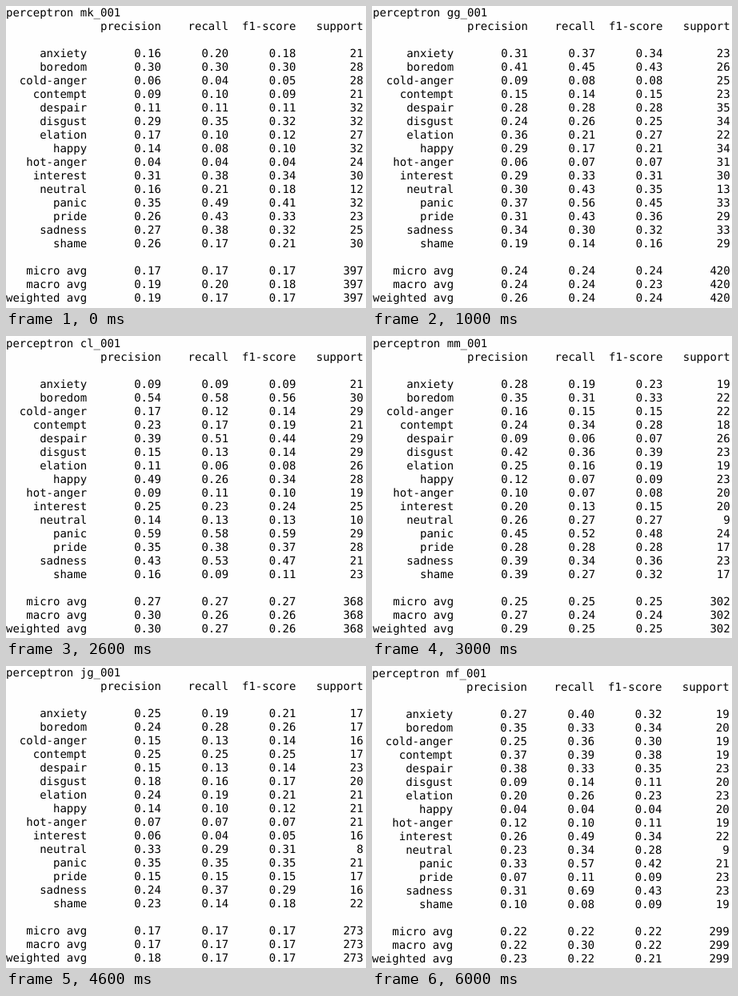
Animation of 450x378 px, one loop 7 s. Source, as an HTML page:

```html
<!DOCTYPE html>
<html lang="en">
<head>
<meta charset="utf-8">
<title>Classification reports</title>
<style>
  html, body { margin: 0; width: 100%; height: 100%; overflow: hidden; background: #fefefe; }
  pre {
    position: absolute; left: 0; top: 1px; margin: 0;
    font: 14px/17px "DejaVu Sans Mono", monospace;
    color: #000; text-rendering: geometricPrecision;
  }
</style>
</head>
<body>
<pre id="report"></pre>
<script>
const HOLD = 1000;
const HEADER = ['', 'precision', 'recall', 'f1-score', 'support'];
const LABELS = ['anxiety', 'boredom', 'cold-anger', 'contempt', 'despair', 'disgust',
  'elation', 'happy', 'hot-anger', 'interest', 'neutral', 'panic', 'pride', 'sadness',
  'shame'];

// Averages are [precision, recall, f1]; x and y nudge the whole text.
const REPORTS = [
  { name: 'mk_001', x: 0, y: 0, total: 397, micro: .17, macro: [.19, .20, .18], weighted: [.19, .17, .17] },
  { name: 'gg_001', x: 1, y: 0, total: 420, micro: .24, macro: [.24, .24, .23], weighted: [.26, .24, .24] },
  { name: 'cl_001', x: 0, y: 1, total: 368, micro: .27, macro: [.30, .26, .26], weighted: [.30, .27, .26] },
  { name: 'mm_001', x: 1, y: 1, total: 302, micro: .25, macro: [.27, .24, .24], weighted: [.29, .25, .25] },
  { name: 'jg_001', x: 0, y: 0, total: 273, micro: .17, macro: [.17, .17, .17], weighted: [.18, .17, .17] },
  { name: 'cc_001', x: 1, y: 0, total: 265, micro: .16, macro: [.15, .16, .15], weighted: [.17, .16, .15] },
  { name: 'mf_001', x: 0, y: 1, total: 299, micro: .22, macro: [.22, .30, .22], weighted: [.23, .22, .21] },
];

function seededRandom(seed) {
  return () => (seed = seed * 16807 % 2147483647) / 2147483647;
}

const sum = values => values.reduce((a, b) => a + b, 0);

const formatLine = (label, cells) =>
  label.padStart(12) + ' ' + cells.map(cell => String(cell).padStart(10)).join('');

const scoreLine = (label, scores, support) =>
  formatLine(label, [...scores.map(score => score.toFixed(2)), support]);

// Scores scatter around the macro averages; supports share out the total.
function labelLines({ total, macro: [precision, recall] }, seed) {
  const random = seededRandom(seed);
  const shares = LABELS.map(label => label === 'neutral' ? 0.45 : 0.8 + 0.5 * random());
  const scale = total / sum(shares);
  let reached = 0;
  return LABELS.map((label, i) => {
    const before = Math.round(reached);
    reached += shares[i] * scale;
    const skill = 0.2 + 1.6 * random();
    const p = precision * skill * (0.8 + 0.4 * random());
    const r = recall * skill * (0.6 + 0.8 * random());
    return scoreLine(label, [p, r, 2 * p * r / (p + r)], Math.round(reached) - before);
  });
}

function formatReport(report, index) {
  const { name, total, micro, macro, weighted } = report;
  return [
    'perceptron ' + name,
    formatLine(HEADER[0], HEADER.slice(1)),
    '',
    ...labelLines(report, 7919 * (index + 1)),
    '',
    scoreLine('micro avg', [micro, micro, micro], total),
    scoreLine('macro avg', macro, total),
    scoreLine('weighted avg', weighted, total),
  ].join('\n');
}

const pre = document.getElementById('report');
const texts = REPORTS.map(formatReport);
let shown = -1;

function draw() {
  const index = Math.floor(performance.now() / HOLD) % REPORTS.length;
  if (index !== shown) {
    const { x, y } = REPORTS[index];
    shown = index;
    pre.textContent = texts[index];
    pre.style.transform = `translate(${x}px, ${y}px)`;
  }
  requestAnimationFrame(draw);
}
draw();
</script>
</body>
</html>
```
